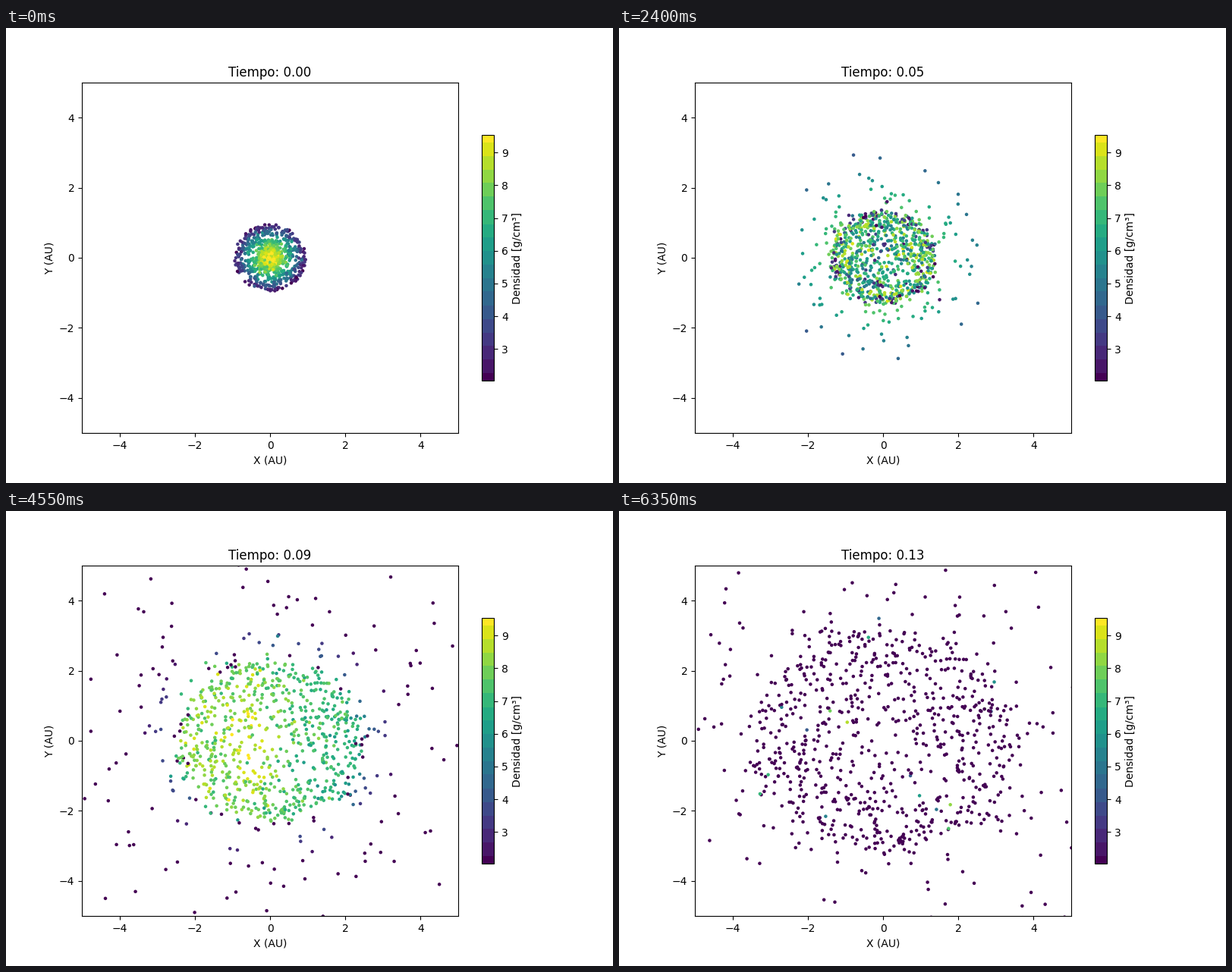
A matplotlib script that plays this animation: 800 by 600 pixels, repeating every 6400 ms.

```python
import numpy as np
import matplotlib.pyplot as plt
from matplotlib.animation import FuncAnimation
from matplotlib.colors import ListedColormap

FRAMES, STEP_MS = 128, 50
LOW, HIGH = 2.040, 9.531
KEYS = np.array([0, 32, 48, 66, 91, 111, 127])
REF = 66  # step at which a fast particle has gone as far as its reach
BULK, FAST = 740, 190
rng = np.random.default_rng(12)


def softplus(x, width):
    return width * np.logaddexp(0, x / width)


# Slow cloud: starts dense in the middle, opens into a disc with a full rim
share = rng.random(BULK)
angle = rng.uniform(0, 2 * np.pi, BULK)
spread = rng.normal(0, 0.05, BULK)
spread += 0.1 * rng.exponential(1, BULK) * (rng.random(BULK) < 0.2)


def bulk_xy(i):
    edge = 0.92 + softplus(i - 40, 16) * 0.0272
    power = 0.88 - 0.5 / (1 + np.exp((22 - i) / 6))
    loose = np.clip((i - 20) / 40, 0, 1)
    r = edge * share ** power * (1 + spread * loose)
    return (r * np.cos(angle) * (1 + 0.03 * loose),
            r * np.sin(angle) * (1 - 0.04 * loose))


# Fast particles: leave the core radially, the fastest ones first
reach = 1.5 + 3.1 * rng.beta(1, 2, FAST)
course = np.arange(FAST) * np.pi * (3 - 5 ** 0.5) + rng.normal(0, 0.1, FAST)
onset = 10 + 2.2 * np.clip(4.7 - reach, 0, 3)
core = 0.3 * np.sqrt(rng.random(FAST))


def fast_r(i):
    flow = reach * softplus(i - onset, 3) / softplus(REF - onset, 3)
    return np.hypot(core, flow)


def fast_xy(i):
    r = fast_r(i)
    return r * np.cos(course), r * np.sin(course)


def bulk_density():
    def noise(s):
        return rng.normal(0, s, BULK)

    def scatter(base, chance, low, high):
        picked = rng.random(BULK) < chance
        return np.where(picked, rng.uniform(low, high, BULK), base)

    floor = np.full(BULK, LOW)
    rim = np.clip((share - 0.55) / 0.3, 0, 1)
    d0 = 9.5 - 7.1 * share ** 1.25 + noise(0.55)
    d32 = 7.2 + noise(1.2) - 3.9 * rim
    d48 = scatter(6.6 + noise(1), 0.1 + 0.3 * (share > 0.75), LOW, 4)
    d48 = scatter(d48, 0.12, 8, 9.2)
    x, _ = bulk_xy(66)
    d66 = 8.2 - 0.28 * x + noise(0.4)
    x, y = bulk_xy(91)
    outside = np.clip(np.hypot(x, y) - 2.3, 0, 2)
    d91 = 7.5 - 0.3 * x + noise(0.55) - 3.5 * outside
    d91 += 1.2 * np.exp(-2 * (x + 0.5) ** 2 - y ** 2 / 2)
    d111 = scatter(scatter(floor, 0.12, 2.5, 6), 0.012, 6, HIGH)
    d127 = scatter(floor, 0.025, 3.5, HIGH)
    return np.array([d0, d32, d48, d66, d91, d111, d127])


def fast_density():
    floor = np.full(FAST, LOW)
    inner = reach < 1.75
    d0 = 9.6 - 3.5 * core + rng.normal(0, 0.3, FAST)
    d32 = rng.uniform(9, 9.4, FAST)
    d48 = 11 - 2.3 * fast_r(48)
    d66 = np.where(inner, rng.uniform(2.2, 5, FAST), 12.2 - 2.45 * fast_r(66))
    d91 = np.where(inner, LOW, 11.5 - 2.7 * fast_r(91))
    return np.array([d0, d32, d48, d66, d91, floor, floor])


density = np.clip(np.hstack([bulk_density(), fast_density()]), LOW, HIGH)
order = rng.permutation(BULK + FAST)


def state(i):
    xy = np.hstack([bulk_xy(i), fast_xy(i)]).T
    k = min(np.searchsorted(KEYS, i, side="right") - 1, len(KEYS) - 2)
    t = (i - KEYS[k]) / (KEYS[k + 1] - KEYS[k])
    rho = density[k] * (1 - t) + density[k + 1] * t
    return xy[order], rho[order]


bands = np.round(np.linspace(0, 1, 256) * 18) / 18
cmap = ListedColormap(plt.get_cmap("viridis")(bands))

fig, ax = plt.subplots(figsize=(8, 6), dpi=100)
pos, rho = state(0)
dots = ax.scatter(pos[:, 0], pos[:, 1], c=rho, s=5, cmap=cmap, vmin=LOW, vmax=HIGH)
fig.colorbar(dots, ax=ax, shrink=0.7, label="Densidad [g/cm³]")
ax.set(xlim=(-5, 5), ylim=(-5, 5), xlabel="X (AU)", ylabel="Y (AU)")
title = ax.set_title("Tiempo: 0.00")


def update(i):
    pos, rho = state(i)
    dots.set_offsets(pos)
    dots.set_array(rho)
    title.set_text(f"Tiempo: {i * 0.001:.2f}")
    return dots, title


anim = FuncAnimation(fig, update, frames=FRAMES, interval=STEP_MS, repeat=True, repeat_delay=0)
plt.show()
```
